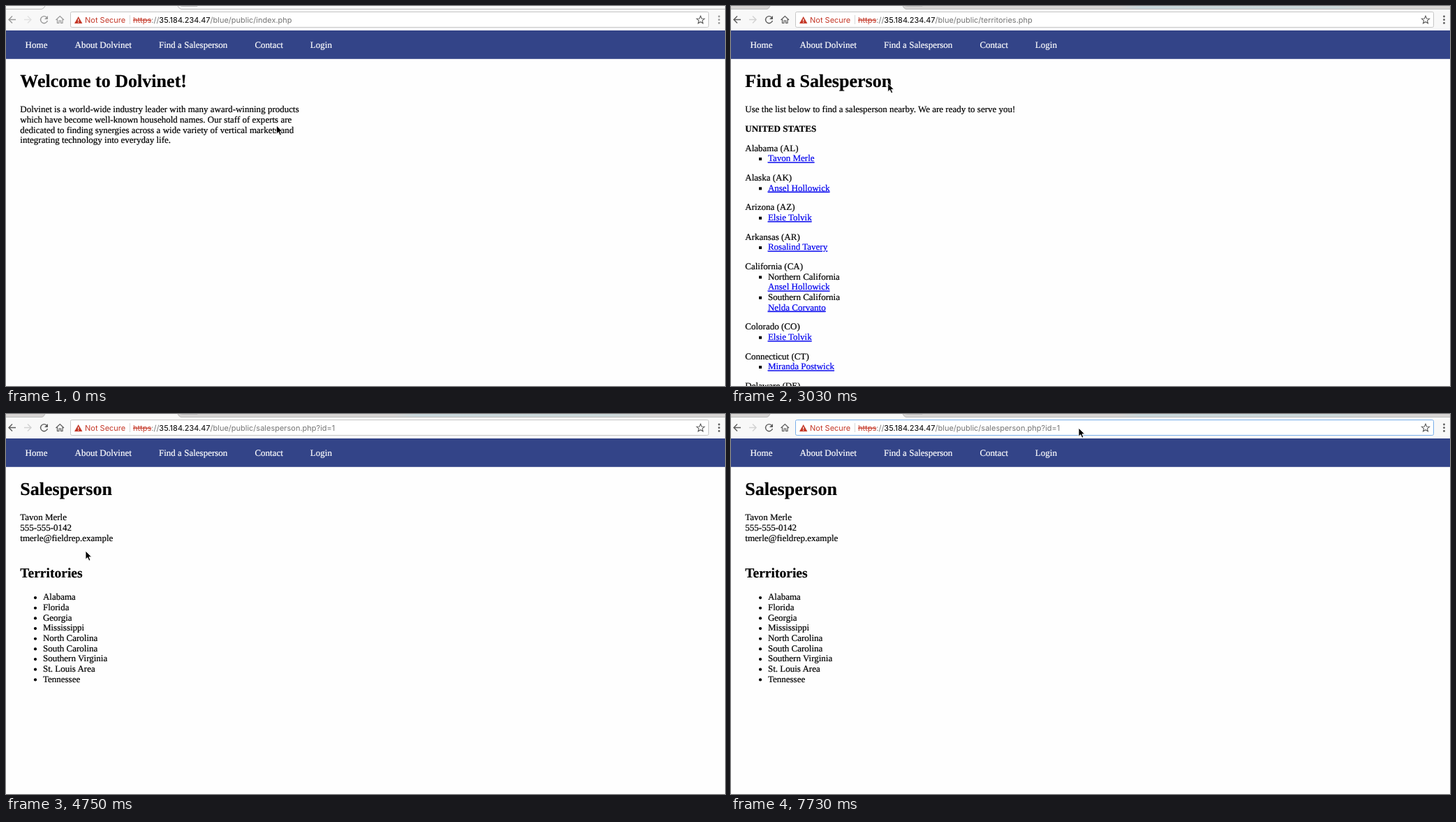
Write an HTML page that moves like this. It is 1030 px wide and 544 px high and loops after 8000 ms.

```html
<!DOCTYPE html>
<html lang="en">
<head>
<meta charset="utf-8">
<title>Find a Salesperson</title>
<style>
  html, body { margin: 0; width: 100%; height: 100%; overflow: hidden; background: #fefefe; }
  svg { display: block; }
  text { font: 13.03px "Liberation Serif", Times, serif; text-rendering: geometricPrecision; white-space: pre; stroke: #000; stroke-width: .2; }
  .h1 { font-size: 26.06px; font-weight: bold; }
  .h2 { font-size: 19.55px; font-weight: bold; }
  .bold { font-weight: bold; }
  .link { fill: #0000ee; stroke: #0000ee; text-decoration: underline; }
  .nav { fill: #fff; stroke: #fff; }
  .ui { font: 11px Inter, Roboto, sans-serif; stroke: none; }
  .grey { fill: #757575; }
  .red { fill: #c53929; }
  .strike { text-decoration: line-through; }
  .icon { fill: none; stroke: #5c5c5c; stroke-width: 1.4; }
</style>
</head>
<body>
<svg width="1030" height="544" viewBox="0 0 1030 544">
  <defs>
    <linearGradient id="strip">
      <stop offset=".54" stop-color="#d7d5d4"/>
      <stop offset=".57" stop-color="#c9d7db"/>
      <stop offset=".84" stop-color="#ccd8da"/>
      <stop offset=".9" stop-color="#d7d5d4"/>
    </linearGradient>
  </defs>

  <!-- browser bar -->
  <rect width="1030" height="36" fill="#f8f8f8"/>
  <g id="tabs">
    <rect width="1030" height="5" fill="url(#strip)"/>
    <path d="M52 5Q55 4 56 0H246Q247 4 251 5Z" fill="#f8f8f8"/>
  </g>
  <path d="M0 4.5H51Q54 4 56 0M246 0Q248 4 251 4.5H1030" fill="none" stroke="#bdbdbd"/>
  <path d="M250 0Q251 .5 253 .5H274V0" fill="#ececec" stroke="#c0c0c0"/>
  <g id="icons">
    <path class="icon" d="M14 19.5H4M9 14.5L4 19.5L9 24.5"/>
    <path class="icon" d="M26 19.5H36M31 14.5L36 19.5L31 24.5" style="stroke:#d2d2d2"/>
    <g id="reload">
      <path class="icon" d="M58.2 16.2A5 5 0 1 0 59.4 21"/>
      <path d="M60 14V19H55Z" fill="#5c5c5c"/>
    </g>
    <path id="stop" class="icon" d="M50 15L59.5 24.5M59.5 15L50 24.5"/>
    <path class="icon" d="M71.5 20L77.3 14.5L83 20M73.5 19V24.5H76V21H78.6V24.5H81V19" style="stroke-width:1.2"/>
    <g fill="#5c5c5c"><circle cx="1021.5" cy="15" r="1.4"/><circle cx="1021.5" cy="19.7" r="1.4"/><circle cx="1021.5" cy="24.4" r="1.4"/></g>
  </g>
  <rect id="field" x="92.5" y="8.5" width="914" height="22" rx="2" fill="#fff"/>
  <path d="M98 25L103.7 15L109.4 25Z" fill="#c53929"/>
  <path d="M103.7 18.5V21.7M103.7 22.7V24" stroke="#fff" stroke-width="1.2"/>
  <text class="ui red" x="113" y="24">Not Secure</text>
  <path d="M177.5 13V26" stroke="#d8d8d8"/>
  <rect id="selection" x="182" y="12" width="294" height="15" fill="#b5d5fd"/>
  <text class="ui" x="182" y="24"><tspan class="red strike">https</tspan><tspan class="grey">://</tspan>35.184.234.47<tspan class="grey" id="path"></tspan></text>
  <path id="caret" d="M475.5 13V27" stroke="#000"/>
  <path d="M995 14.2L996.6 18L1000.6 18.3L997.5 20.9L998.5 24.8L995 22.7L991.5 24.8L992.5 20.9L989.4 18.3L993.4 18Z" fill="none" stroke="#5c5c5c" stroke-width="1.1"/>

  <rect y="35" width="1030" height="40.8" fill="#334488"/>
  <g id="nav"></g>
  <g id="home"></g>
  <g id="list"></g>
  <g id="person"></g>

  <g id="cursor">
    <path id="arrow" d="M0 0V12.2L2.8 9.6L4.9 14.2L7 13.2L5 8.8H8.8Z" stroke="#fff" stroke-width=".9"/>
    <path id="hand" transform="scale(.92)" d="M-1 1Q0 -.5 1.2 1L2.4 5Q3.6 4 4.6 5.2Q5.8 4.4 6.6 5.8Q8 5.2 8.4 6.8L8.8 10L7.6 14H1.4L-2.6 9Q-3.4 7.4 -1.6 7.4L.4 8.8ZM2.8 9.5V12M4.6 9.5V12M6.4 9.5V12" fill="#fff" stroke="#000"/>
    <g id="ibeam" fill="none">
      <path d="M-2.5 -4Q0 -4 .5 -2.5Q1 -4 3.5 -4M.5 -3V7M-2.5 8Q0 8 .5 6.5Q1 8 3.5 8M-1 3H2" stroke="#fff" stroke-width="2.4"/>
      <path d="M-2.5 -4Q0 -4 .5 -2.5Q1 -4 3.5 -4M.5 -3V7M-2.5 8Q0 8 .5 6.5Q1 8 3.5 8M-1 3H2" stroke="#000" stroke-width="1.2"/>
    </g>
  </g>
</svg>
<script>
const $ = id => document.getElementById(id);
const LINE = 14.66, GAP = 13.03, LEFT = 20.3, INDENT = 52.9;

function add(parent, tag, attrs, text = "") {
  const el = document.createElementNS("http://www.w3.org/2000/svg", tag);
  for (const key in attrs) el.setAttribute(key, attrs[key]);
  el.textContent = text;
  $(parent).append(el);
}
const write = (parent, x, y, text, cls = "") => add(parent, "text", { x, y, class: cls }, text);
const lines = (parent, y, rows) => rows.forEach((row, i) => write(parent, LEFT, y + i * LINE, row));

[[27.6, "Home"], [98.5, "About Dolvinet"], [219, "Find a Salesperson"], [356.4, "Contact"], [435.8, "Login"]]
  .forEach(([x, label]) => write("nav", x, 60.3, label, "nav"));

write("home", LEFT, 116.3, "Welcome to Dolvinet!", "h1");
lines("home", 152.3, [
  "Dolvinet is a world-wide industry leader with many award-winning products",
  "which have become well-known household names. Our staff of experts are",
  "dedicated to finding synergies across a wide variety of vertical markets and",
  "integrating technology into everyday life."
]);

write("list", LEFT, 116.3, "Find a Salesperson", "h1");
write("list", LEFT, 152.3, "Use the list below to find a salesperson nearby. We are ready to serve you!");
write("list", LEFT, 180, "UNITED STATES", "bold");
let y = 207.7;
// an entry is a person, or a region and its person
[
  ["Alabama (AL)", ["Tavon Merle"]],
  ["Alaska (AK)", ["Ansel Hollowick"]],
  ["Arizona (AZ)", ["Elsie Tolvik"]],
  ["Arkansas (AR)", ["Rosalind Tavery"]],
  ["California (CA)", ["Northern California", "Ansel Hollowick"], ["Southern California", "Nelda Corvanto"]],
  ["Colorado (CO)", ["Elsie Tolvik"]],
  ["Connecticut (CT)", ["Miranda Postwick"]],
  ["Delaware (DE)"]
].forEach(([state, ...entries]) => {
  write("list", LEFT, y, state);
  y += LINE;
  for (const entry of entries) {
    add("list", "rect", { x: 40, y: y - 5.4, width: 4, height: 4 });
    entry.forEach((text, i) => {
      write("list", INDENT, y, text, i === entry.length - 1 ? "link" : "");
      y += LINE;
    });
  }
  y += GAP;
});

write("person", LEFT, 116.3, "Salesperson", "h1");
lines("person", 152.3, ["Tavon Merle", "555-555-0142", "tmerle@fieldrep.example"]);
write("person", LEFT, 233.8, "Territories", "h2");
["Alabama", "Florida", "Georgia", "Mississippi", "North Carolina", "South Carolina",
 "Southern Virginia", "St. Louis Area", "Tennessee"].forEach((name, i) => {
  const base = 266.4 + i * LINE;
  add("person", "circle", { cx: 42, cy: base - 3.3, r: 2.1 });
  write("person", INDENT, base, name);
});

// pointer moves: first step, last step, number of steps, destination
const moves = [
  [140, 940, 6, 288, 55],
  [2740, 2890, 2, 254, 84],
  [3030, 3710, 5, 107.5, 217],
  [3850, 4150, 3, 110, 206],
  [4600, 4750, 2, 114, 196],
  [4900, 5340, 4, 485, 2],
  [5490, 5640, 2, 489, 28],
  [5790, 6080, 3, 498, 20]
];
const shapes = [[0, "arrow"], [700, "hand"], [2740, "arrow"], [3700, "hand"], [4600, "arrow"], [5790, "ibeam"], [6530, "arrow"]];
const pages = [[0, "home"], [3030, "list"], [4600, "person"]];
const paths = [[0, "index.php"], [2740, "territories.php"], [4600, "salesperson.php?id=1"]];

const current = (track, t) => track.filter(([start]) => t >= start).pop()[1];
const show = (id, on) => $(id).style.display = on ? "" : "none";

function pointer(t) {
  let x = 387.5, y = 171;
  for (const [start, end, steps, toX, toY] of moves) {
    if (t < start) break;
    const step = Math.floor((t - start) / (end - start) * (steps - 1) + 1.1);
    const u = Math.min(1, step / steps);
    x += (toX - x) * u;
    y += (toY - y) * u;
  }
  return `translate(${x} ${y})`;
}

function draw() {
  const t = performance.now() % 8000;
  const page = current(pages, t), shape = current(shapes, t);
  const active = t >= 140, focused = t >= 6530;
  const loading = t >= 2140 && t < 3030;
  for (const id of ["home", "list", "person"]) show(id, id === page);
  for (const id of ["arrow", "hand", "ibeam"]) show(id, id === shape);
  show("tabs", active);
  $("icons").setAttribute("opacity", active ? 1 : .6);
  show("stop", loading);
  show("reload", !loading);
  show("selection", focused && t < 7130);
  show("caret", t >= 7130 && t < 7730);
  $("field").setAttribute("stroke", focused ? "#78aeea" : "#c6c6c6");
  $("path").textContent = "/blue/public/" + current(paths, t);
  $("cursor").setAttribute("transform", pointer(t));
  requestAnimationFrame(draw);
}
draw();
</script>
</body>
</html>
```
